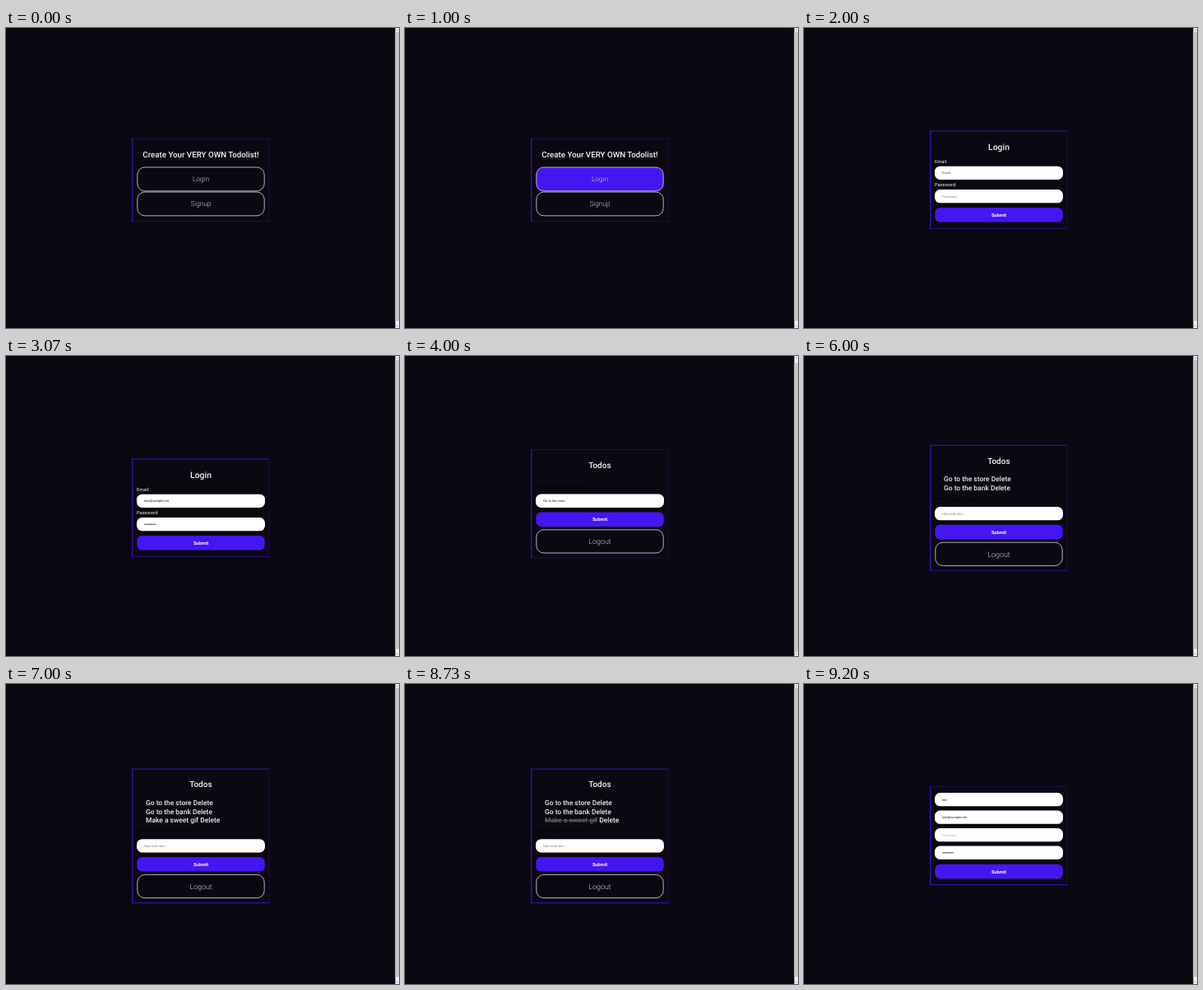
An HTML page that plays this animation: 478 px wide and 364 px high, repeating every 9990 ms.

```html
<!DOCTYPE html>
<html lang="en">
<head>
<meta charset="utf-8">
<title>Todolist</title>
<style>
  html, body { margin: 0; width: 100%; height: 100%; overflow: hidden; background: #0b0812; }
  svg { display: block; width: 100vw; height: 100vh; }
  text { font-family: Roboto, sans-serif; text-rendering: geometricPrecision; white-space: pre; }
  .field { font-family: "Liberation Sans", Arial, sans-serif; font-size: 4px; }
</style>
</head>
<body>
<svg id="stage" viewBox="0 0 478 364"></svg>
<script>
const stage = document.getElementById('stage');
const LOOP = 9990, MID = 237;
const BG = '#0b0812', PURPLE = '#4417f2', EDGE = '#3516b8', SOFT = '#24127a', DIM = '#1b1048';
const ITEMS = ['Go to the store', 'Go to the bank', 'Make a sweet gif'];
const PITCH = 10.5;

const rect = (x, y, w, h, fill, more = '') =>
  `<rect x="${x}" y="${y}" width="${w}" height="${h}" fill="${fill}" ${more}/>`;

const text = (x, y, s, size, fill, more = '') =>
  `<text x="${x}" y="${y}" font-size="${size}" fill="${fill}" ${more}>${s}</text>`;

const centred = (y, s, size, weight, fill = '#f2f2f4') =>
  text(MID, y, s, size, fill, `text-anchor="middle" font-weight="${weight}"`);

// Edge colours: top, right, bottom, left
function panel(top, bottom, [t, r, b, l]) {
  const h = bottom - top;
  return rect(153, top, 167.4, 1, t) + rect(319.5, top, .9, h, r) +
    rect(153, bottom - 1, 167.4, 1, b) + rect(153.1, top, 1.3, h, l);
}

const input = (y, s, fill) =>
  rect(159, y, 156, 16.3, '#fff', 'rx="6.5"') +
  `<text class="field" x="168" y="${y + 9.6}" fill="${fill}">${s}</text>`;

const dots = (y, n) => {
  let out = '';
  for (let i = 0; i < n; i++) out += `<circle cx="${169 + i * 1.75}" cy="${y + 8.2}" r=".7" fill="#222"/>`;
  return out;
};

const submit = y =>
  rect(159.3, y, 155.4, 17.6, PURPLE, 'rx="6"') + centred(y + 10.8, 'Submit', 5.7, 700, '#fff');

const outline = (y, h, s, size, fill = 'none') =>
  rect(159.8, y + .5, 154.4, h - 1, fill, 'rx="9" stroke="#c8c8cc" stroke-width=".9"') +
  centred(y + h / 2 + size * .36, s, size, 300, '#d0ccd2');

function scrollbar(low) {
  const y = low ? 8.5 : 4.5;
  return rect(473.5, 0, 4.5, 364, '#f1f1f1') + rect(473.5, y, 4.5, 351, '#c6c6c6') +
    '<path d="M475 2.8h2l-1-1.4z M475 361.2h2l-1 1.4z" fill="#666"/>';
}

function home(hover) {
  return panel(134, 235, [DIM, DIM, DIM, EDGE]) +
    centred(157.4, 'Create Your VERY OWN Todolist!', 9.75, 500) +
    outline(168.5, 29.8, 'Login', 8.3, hover ? PURPLE : 'none') +
    outline(198.5, 29.8, 'Signup', 8.3);
}

function login(filled) {
  return panel(124.6, 244, [EDGE, DIM, SOFT, EDGE]) +
    centred(148, 'Login', 10.4, 500) +
    text(159, 163.8, 'Email:', 5.7, '#eee') +
    input(167.7, filled ? 'kim@sample.net' : 'Email', filled ? '#222' : '#6b5a5a') +
    text(159, 192, 'Password:', 5.7, '#eee') +
    input(196, filled ? '' : 'Password', '#8a8585') +
    (filled ? dots(196, 8) : '') +
    submit(218);
}

function todos(count, top, entry, edges, fade = 0) {
  const shift = count * 10.3;
  const y = top + 54.6 + shift;
  let out = panel(top, top + 132.5 + shift, edges) + centred(top + 22.7, 'Todos', 10, 500);
  for (let i = 0; i < count; i++) {
    const base = top + 44.3 + i * PITCH;
    const done = i === 2 && fade > 0;
    const grey = Math.round(236 - (done ? 126 * fade : 0));
    const tone = `rgb(${grey},${grey},${grey})`;
    const style = done ? 'text-decoration="line-through"' : '';
    out += `<circle cx="164.5" cy="${base - 2.7}" r="1.4" fill="#000"/>` +
      `<text x="170" y="${base}" font-size="8.45" font-weight="500" fill="#ececee">` +
      `<tspan fill="${tone}" ${style}>${ITEMS[i]}</tspan> Delete</text>`;
  }
  return out +
    text(159.5, y - 7.8, 'What would you like to do?', 5, '#000') +
    input(y, entry || 'New todo item ...', entry ? '#222' : '#857f7f') +
    submit(y + 21.8) +
    outline(y + 42.7, 29.2, 'Logout', 8.9);
}

function signup() {
  return panel(124, 244, [DIM, DIM, EDGE, EDGE]) +
    input(132, 'kim', '#222') +
    input(153.5, 'kim@sample.net', '#222') +
    input(175, 'Password', '#b5b1b1') +
    input(196.5, '', '#222') + dots(196.5, 8) +
    submit(218.7);
}

function scene(t) {
  if (t < 2000) return home(t >= 1000);
  if (t < 4000) return login(t >= 3000);
  if (t < 5000) return todos(0, 113, ITEMS[0], [DIM, DIM, DIM, EDGE]);
  if (t < 6000) return todos(1, 113, ITEMS[1], [DIM, DIM, DIM, EDGE]);
  if (t < 7000) return todos(2, 107.8, '', [EDGE, DIM, SOFT, EDGE]);
  if (t < 9000) {
    const fade = Math.min(1, Math.max(0, (t - 7950) / 450));
    return todos(3, 102.7, '', [EDGE, DIM, EDGE, EDGE], fade);
  }
  return signup();
}

let shown = '';
function draw(now) {
  const t = now % LOOP;
  const next = rect(0, 0, 478, 364, BG) + scene(t) + scrollbar(t >= 4000 && t < 5000);
  if (next !== shown) stage.innerHTML = shown = next;
}

const start = performance.now();
function tick() {
  draw(performance.now() - start);
  requestAnimationFrame(tick);
}
tick();
</script>
</body>
</html>
```
